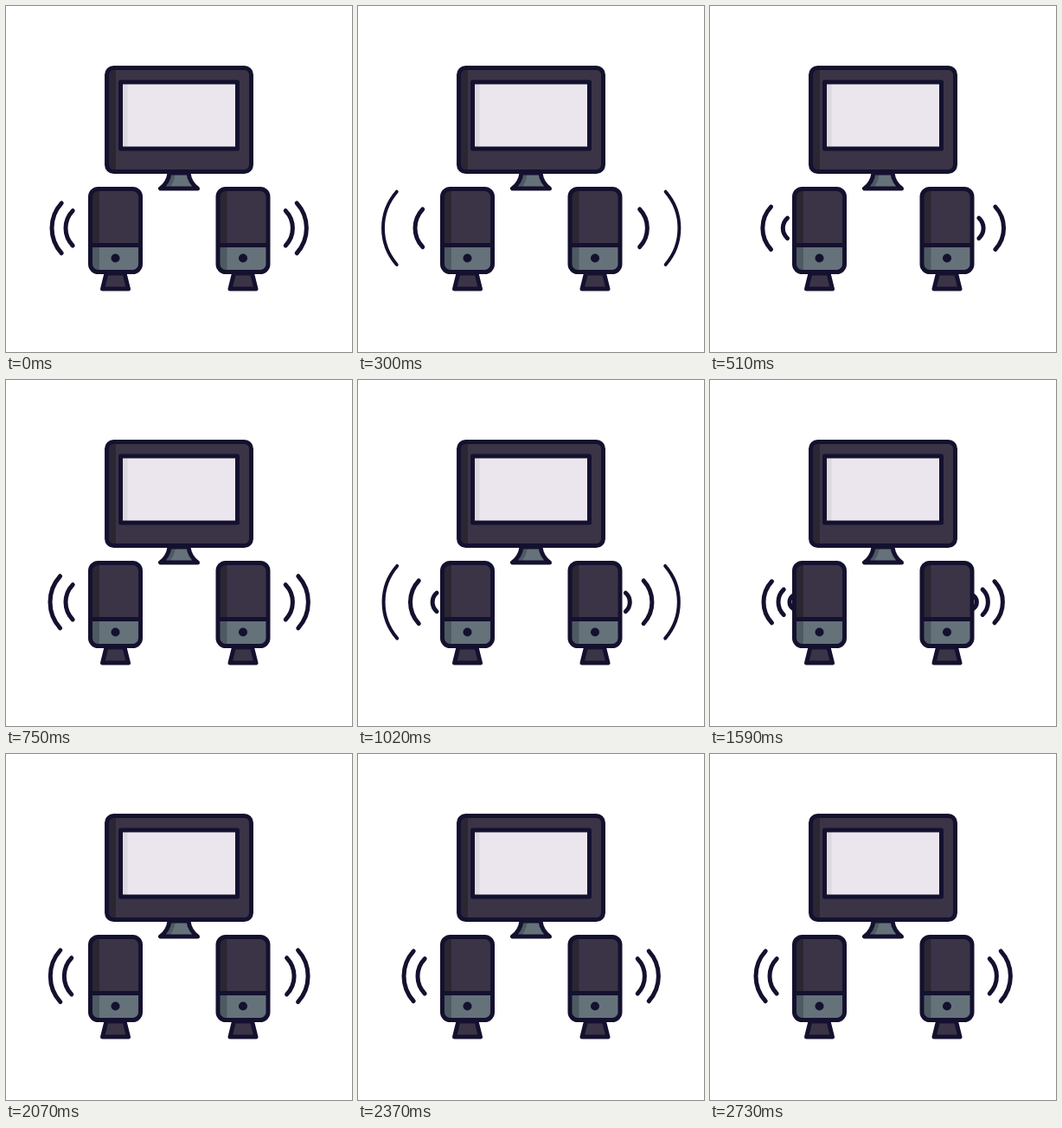
Recreate the animation shown at these times as an HTML page. Size 400 px wide and 400 px high, loop 4.79 s.

```html
<!DOCTYPE html>
<html lang="en">
<head>
<meta charset="utf-8">
<title>Desktop speakers</title>
<style>
  html, body { margin: 0; width: 100%; height: 100%; overflow: hidden; background: #fff; }
  svg { display: block; width: 100vw; height: 100vh; }
  .line { fill: none; stroke: #14112f; stroke-width: 5; stroke-linecap: round; stroke-linejoin: round; }
  .body { fill: #3b3447; }
  .dark { fill: #2a2632; }
  .grey { fill: #65727a; }
  .slate { fill: #4d5a62; }
</style>
</head>
<body>
<svg viewBox="0 0 400 400">
  <defs>
    <clipPath id="case"><rect x="97.5" y="211.5" width="58" height="96" rx="9"/></clipPath>
    <clipPath id="frame"><rect x="116.5" y="71.5" width="167" height="120" rx="8"/></clipPath>
    <g id="speaker">
      <path class="body" d="M116 309H137L141.500 327H111.500Z"/>
      <path class="line" d="M116 309H137L141.500 327H111.500Z"/>
      <g clip-path="url(#case)">
        <rect class="body" x="95" y="209" width="63" height="68"/>
        <rect class="dark" x="95" y="209" width="13" height="68"/>
        <rect class="grey" x="95" y="277" width="63" height="33"/>
        <rect class="slate" x="95" y="277" width="13" height="33"/>
      </g>
      <path class="line" d="M98 276.500H155"/>
      <rect class="line" x="97.5" y="211.5" width="58" height="96" rx="9"/>
      <circle cx="126.500" cy="291.500" r="5" fill="#14112f"/>
    </g>
  </defs>

  <path class="grey" d="M189 193C188 202 184 207 178.500 211H221.500C216 207 212 202 211 193Z"/>
  <path class="slate" d="M189 193C188 202 184 207 178.500 211H188C193 206 195 200 196 193Z"/>
  <path class="line" d="M189 193C188 202 184 207 178.500 211H221.500C216 207 212 202 211 193Z"/>
  <g clip-path="url(#frame)">
    <rect class="body" x="114" y="69" width="172" height="125"/>
    <rect class="dark" x="114" y="69" width="13" height="125"/>
  </g>
  <rect class="line" x="116.5" y="71.500" width="167" height="120" rx="8"/>
  <rect x="132.500" y="88" width="135" height="77" fill="#ebe6ed"/>
  <rect x="132.500" y="88" width="8" height="77" fill="#ded8df"/>
  <rect class="line" x="132.500" y="88" width="135" height="77"/>

  <g id="waves"></g>
  <use href="#speaker"/>
  <use href="#speaker" x="147.500"/>
</svg>
<script>
const LOOP = 4790, STEP = 30, END = 2730;
const HIDDEN = 14, FADE = 66, GONE = 94;

// One row per sound wave: time in ms, distance from the speaker's centre
const waves = [
  [[0, 59], [150, 70], [300, 83], [420, 94]],
  [[0, 43], [300, 46], [750, 61], [1080, 89.5], [1100, 94]],
  [[330, 14], [500, 27], [750, 43], [1230, 59], [1570, 89.5], [1590, 94]],
  [[760, 14], [1000, 25], [1230, 35], [1590, 50], [1820, 64.5], [2070, 60.7], [2220, 59], [2700, 59]],
  [[1240, 14], [1590, 33], [1820, 47.5], [2070, 44.7], [2220, 43], [2700, 43]],
  [[1500, 14], [1590, 20], [1700, 14]]
];

const slope = (a, b) => (b[1] - a[1]) / (b[0] - a[0]);

// Smooth curve through the keys, flat at turning points
function tangent(keys, i) {
  if (!i) return slope(keys[0], keys[1]);
  if (i === keys.length - 1) return slope(keys[i - 1], keys[i]);
  const a = slope(keys[i - 1], keys[i]), b = slope(keys[i], keys[i + 1]);
  return a * b <= 0 ? 0 : 2 * a * b / (a + b);
}

function valueAt(keys, t) {
  const last = keys.length - 1;
  if (t <= keys[0][0]) return keys[0][1];
  if (t >= keys[last][0]) return keys[last][1];
  const i = keys.findIndex(k => k[0] > t) - 1;
  const [t0, v0] = keys[i], [t1, v1] = keys[i + 1];
  const d = t1 - t0, u = (t - t0) / d, w = 1 - u;
  return w * w * (1 + 2 * u) * v0 + u * u * (3 - 2 * u) * v1
    + d * u * w * (w * tangent(keys, i) - u * tangent(keys, i + 1));
}

function arc(r) {
  const h = 0.55 * r - 3.5, sag = 0.19 * r;
  const R = (h * h + sag * sag) / (2 * sag), x = 112 - r + sag;
  const side = (px, sweep) => `M${px} ${256.8 - h}A${R} ${R} 0 0 ${sweep} ${px} ${256.8 + h}`;
  return side(x, 0) + side(400.4 - x, 1);
}

const layer = document.getElementById('waves');
const paths = waves.map(() => {
  const p = document.createElementNS('http://www.w3.org/2000/svg', 'path');
  p.setAttribute('class', 'line');
  return layer.appendChild(p);
});

function draw(t) {
  waves.forEach((keys, i) => {
    const r = valueAt(keys, t), shown = r > HIDDEN && r < GONE;
    paths[i].style.display = shown ? '' : 'none';
    if (!shown) return;
    const fade = Math.max(0, (r - FADE) / (GONE - FADE));
    paths[i].setAttribute('d', arc(r));
    paths[i].style.strokeWidth = 5 * (1 - fade ** 3);
  });
}

const start = performance.now();
function tick() {
  const t = (performance.now() - start) % LOOP;
  draw(Math.min(END, Math.floor(t / STEP) * STEP));
  requestAnimationFrame(tick);
}
tick();
</script>
</body>
</html>
```
